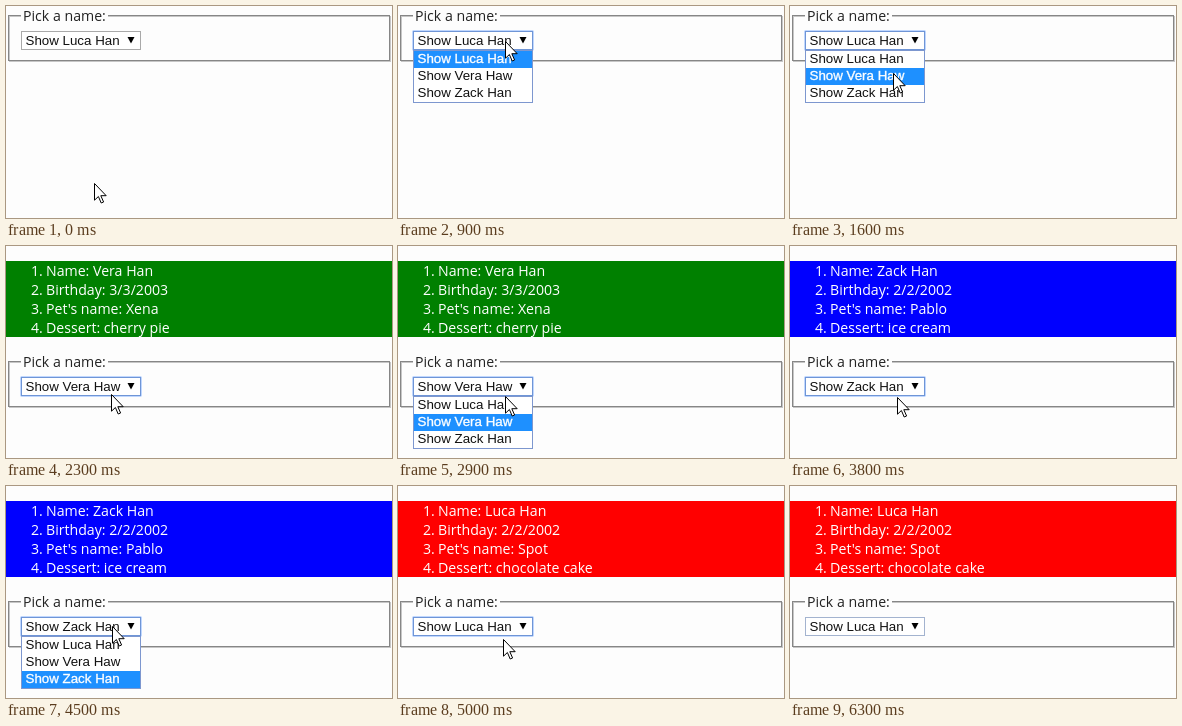
These frames come from a looping animation (386 by 212 pixels, 6.4 s). An HTML page:

```html
<!DOCTYPE html>
<html lang="en">
<head>
<meta charset="utf-8">
<title>Pick a name</title>
<style>
  html, body { margin: 0; width: 100%; height: 100%; overflow: hidden; background: #fdfdfd; }
  svg { display: block; width: 100vw; height: 100vh; }
  text { white-space: pre; }
  .ui { font: 14.15px "Open Sans", "Noto Sans", sans-serif; }
  .ctl { font: 13.33px "Liberation Sans", Arial, sans-serif; fill: #111; }
  .hot { fill: #fff; stroke: #fff; stroke-width: .35px; }
</style>
</head>
<body>
<svg viewBox="0 0 386 212">
  <g id="panel">
    <rect id="band" y="15" width="386" height="76"/>
    <g id="list" class="ui" fill="#fff"></g>
  </g>
  <g id="form">
    <g fill="none">
      <rect x="3.5" y="10.5" width="381" height="45" stroke="#c6c6c6"/>
      <rect x="2.5" y="9.5" width="381" height="45" stroke="#868686"/>
    </g>
    <rect x="15" y="3" width="87" height="14" fill="#fdfdfd"/>
    <text class="ui" x="17" y="14.5" fill="#222">Pick a name:</text>
    <rect id="ring" x="14.5" y="24.5" width="121" height="20" rx="1" fill="none" stroke="#4d90fe" stroke-opacity=".35"/>
    <rect id="box" x="15.5" y="25.5" width="119" height="18" fill="#fff"/>
    <text id="value" class="ctl" x="19.5" y="39"></text>
    <path d="M121.5 31h7l-3.5 6.5z" fill="#000"/>
    <g id="menu">
      <rect x="15.5" y="44.5" width="119" height="52" fill="#fff" stroke="#7d97cf"/>
      <rect id="bar" x="16" width="118" height="17" fill="#1e90ff"/>
    </g>
  </g>
  <path id="cursor" d="M.5 .5V17.2L4.4 13.5 7.2 20 9.6 19 6.8 12.7H12.2Z" fill="#fff" stroke="#000"/>
</svg>
<script>
const LOOP = 6400, STEP = 100, SHIFT = 106;
const $ = id => document.getElementById(id);
const options = ["Show Luca Han", "Show Vera Haw", "Show Zack Han"];
const people = [
  { color: "#f00", info: ["Luca Han", "2/2/2002", "Spot", "chocolate cake"] },
  { color: "#008000", info: ["Vera Han", "3/3/2003", "Xena", "cherry pie"] },
  { color: "#00f", info: ["Zack Han", "2/2/2002", "Pablo", "ice cream"] }
];
const labels = ["Name", "Birthday", "Pet's name", "Dessert"];

// time, chosen person, list shown, highlighted row (-1 = closed), focus
const states = [
  [0, 0, false, -1, false],
  [800, 0, false, 0, true],
  [1400, 0, false, 1, true],
  [1700, 1, true, -1, true],
  [2700, 1, true, 1, true],
  [3200, 1, true, 2, true],
  [3500, 2, true, -1, true],
  [4200, 2, true, 2, true],
  [4600, 2, true, 0, true],
  [4900, 0, true, -1, true],
  [6100, 0, true, -1, false]
];

// time, x, y of the pointer tip
const path = [
  [0, 88, 177], [700, 106, 34], [1000, 107, 36], [1400, 103, 63], [1600, 103, 67],
  [1700, 103, 68], [2100, 107, 143], [2300, 105, 148], [2500, 105, 148],
  [2700, 106, 142], [2900, 107, 150], [3200, 111, 187], [3400, 111, 192],
  [3500, 111, 192], [3900, 106, 143], [4200, 106, 140], [4500, 106, 140],
  [4700, 105, 153], [5600, 105, 153], [6200, 88, 177]
];

function addText(parent, x, y, cls, text = "") {
  const el = document.createElementNS("http://www.w3.org/2000/svg", "text");
  el.setAttribute("x", x);
  el.setAttribute("y", y);
  el.setAttribute("class", cls);
  el.textContent = text;
  parent.append(el);
  return el;
}

const lines = labels.map((_, i) => {
  const y = 29.5 + i * 19;
  addText($("list"), 25, y, "ui", `${i + 1}.`);
  return addText($("list"), 40, y, "ui");
});
const rows = options.map((text, i) => addText($("menu"), 19.5, 57 + i * 17, "ctl", text));

const ease = p => p * p * (3 - 2 * p);

function pointerAt(t) {
  const i = path.findIndex(p => p[0] > t);
  if (i < 0) return path[path.length - 1].slice(1);
  const [t0, x0, y0] = path[i - 1], [t1, x1, y1] = path[i];
  const p = ease((t - t0) / (t1 - t0));
  return [x0 + (x1 - x0) * p, y0 + (y1 - y0) * p];
}

function show(el, on) {
  el.style.display = on ? "" : "none";
}

function draw(t) {
  const [, who, listed, row, focus] = states.filter(s => s[0] <= t).pop();
  const person = people[who];
  show($("panel"), listed);
  $("band").setAttribute("fill", person.color);
  lines.forEach((el, i) => { el.textContent = `${labels[i]}: ${person.info[i]}`; });
  $("form").setAttribute("transform", `translate(0 ${listed ? SHIFT : 0})`);
  $("value").textContent = options[who];
  show($("ring"), focus);
  $("box").setAttribute("stroke", focus ? "#6f95d6" : listed ? "#a3b3cf" : "#a9a9a9");
  show($("menu"), row >= 0);
  $("bar").setAttribute("y", 45 + Math.max(row, 0) * 17);
  rows.forEach((el, i) => el.classList.toggle("hot", i === row));
  const [x, y] = pointerAt(t);
  $("cursor").setAttribute("transform", `translate(${Math.round(x)} ${Math.round(y)})`);
  show($("cursor"), t < 6300);
}

const start = performance.now();
function tick() {
  const t = (performance.now() - start) % LOOP;
  draw(Math.floor(t / STEP) * STEP);
  requestAnimationFrame(tick);
}
tick();
</script>
</body>
</html>
```
